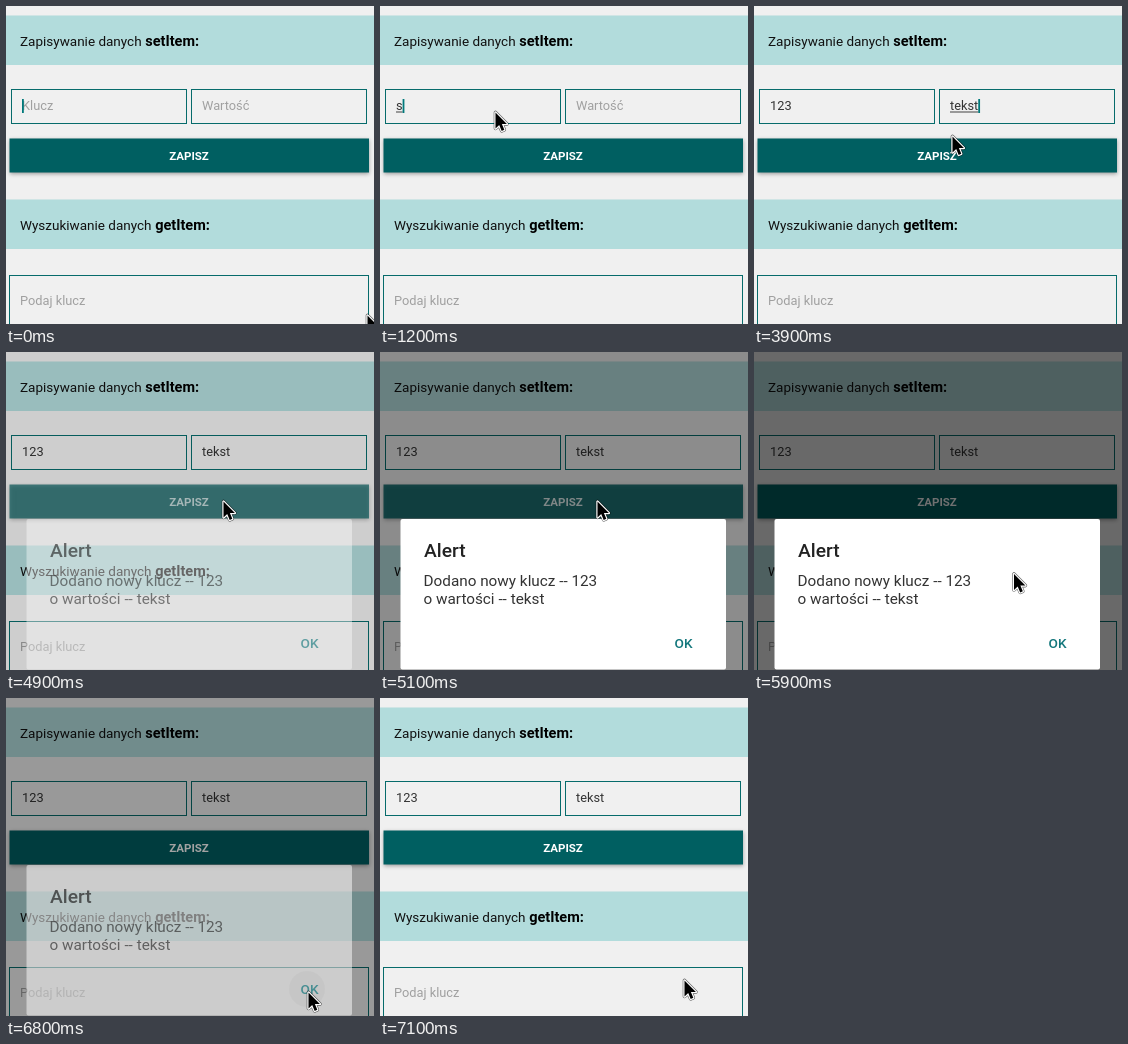
An HTML page with a canvas for the animation above (7.2 s loop, 368x318 px).

```html
<!DOCTYPE html>
<html lang="pl">
<head>
<meta charset="utf-8">
<title>setItem / getItem</title>
<style>
html, body { margin: 0; width: 100%; height: 100%; overflow: hidden; background: #f0f0f0; }
canvas { display: block; width: 368px; height: 318px; }
</style>
</head>
<body>
<canvas id="stage"></canvas>
<script>
const W = 368, H = 318, LOOP = 7200, STEP = 100;
const TEAL = '#005f61', BAND = '#b2dcdc', PAPER = '#f0f0f0', EDGE = '#066b6b';
const HINT = '#a0a0a0', INK = '#333';
const FAMILY = 'Roboto, "Noto Sans", sans-serif';

const canvas = document.getElementById('stage');
const ctx = canvas.getContext('2d');
const ratio = window.devicePixelRatio || 1;
canvas.width = W * ratio;
canvas.height = H * ratio;

const ramp = (t, from, to) => Math.min(1, Math.max(0, (t - from) / (to - from)));
const smooth = p => p * p * (3 - 2 * p);

// Each move glides the pointer to a resting place.
const origin = { x: 361, y: 309 };
const moves = [
  { from: 0, to: 900, x: 115, y: 106 },
  { from: 1900, to: 2500, x: 324, y: 97 },
  { from: 3600, to: 3900, x: 198, y: 130 },
  { from: 3900, to: 4400, x: 217, y: 149 },
  { from: 5500, to: 6300, x: 302, y: 294 },
  { from: 6800, to: 7100, x: 304, y: 282 }
];

function pointerAt(t) {
  return moves.reduce((p, m) => {
    const k = smooth(ramp(t, m.from, m.to));
    return { x: p.x + (m.x - p.x) * k, y: p.y + (m.y - p.y) * k };
  }, origin);
}

function text(str, x, y, size, color, weight = 400) {
  ctx.font = `${weight} ${size}px ${FAMILY}`;
  ctx.fillStyle = color;
  ctx.fillText(str, x, y);
  return ctx.measureText(str).width;
}

function rect(x, y, w, h, color) {
  ctx.fillStyle = color;
  ctx.fillRect(x, y, w, h);
}

function heading(y, label, method) {
  rect(0, y, W, 49.5, BAND);
  const width = text(label + ' ', 14, y + 30.5, 13.5, '#111');
  text(method, 14.3 + width, y + 30.5, 14.5, '#000', 700);
}

function field(x, y, w, h, hint, value, focused) {
  ctx.strokeStyle = EDGE;
  ctx.lineWidth = 1;
  ctx.strokeRect(x + 0.5, y + 0.5, w - 1, h - 1);
  const left = x + 11, base = y + 21;
  const width = value ? text(value, left, base, 12.8, INK) : 0;
  if (!value) text(hint, left, base, 12.8, HINT);
  if (!focused) return;
  if (/[a-z]/.test(value)) rect(left, base + 1.5, width, 1, '#444');
  rect(left + width, base - 11, 1.8, 14, '#00797b');
}

function button(alpha) {
  ctx.save();
  ctx.globalAlpha = alpha;
  ctx.shadowColor = 'rgba(0,0,0,.35)';
  ctx.shadowBlur = 4 * ratio;
  ctx.shadowOffsetY = 1.5 * ratio;
  rect(3.5, 132.5, 359.5, 34, TEAL);
  ctx.shadowColor = 'transparent';
  ctx.textAlign = 'center';
  text('ZAPISZ', 183, 154, 11.5, '#fff', 700);
  ctx.restore();
}

function dialog(alpha, pressed) {
  if (alpha <= 0) return;
  ctx.save();
  ctx.globalAlpha = alpha;
  ctx.fillStyle = '#fff';
  ctx.beginPath();
  ctx.roundRect(20.5, 167, 325.5, 150.5, 2);
  ctx.fill();
  if (pressed) {
    ctx.fillStyle = 'rgba(0,0,0,.05)';
    ctx.beginPath();
    ctx.arc(301, 291, 18, 0, 2 * Math.PI);
    ctx.fill();
  }
  // The lettering stays readable longer than the panel.
  ctx.globalAlpha = Math.sqrt(alpha);
  text('Alert', 44, 205, 19.2, '#222', 500);
  text('Dodano nowy klucz -- 123', 43.5, 234, 15.3, INK);
  text('o wartości -- tekst', 43.5, 252, 15.3, INK);
  text('OK', 294.5, 296, 13.6, '#13777c', 500);
  ctx.restore();
}

const arrowShape = new Path2D('M0 0V16L3.7 12.6L6.2 18.4L8.8 17.3L6.4 11.6H11.4Z');

function arrow({ x, y }) {
  ctx.save();
  ctx.translate(x + 0.5, y + 0.5);
  ctx.lineJoin = 'round';
  ctx.lineWidth = 3.6;
  ctx.strokeStyle = 'rgba(0,0,0,.6)';
  ctx.stroke(arrowShape);
  ctx.lineWidth = 2.4;
  ctx.strokeStyle = '#fff';
  ctx.stroke(arrowShape);
  ctx.fillStyle = '#000';
  ctx.fill(arrowShape);
  ctx.restore();
}

const typed = (word, t, start, gap) =>
  word.slice(0, Math.max(0, Math.floor((t - start) / gap) + 1));

function keyText(t) {
  if (t < 1400) return typed('s', t, 1100, 100);
  return typed('123', t, 1500, 100);
}

function draw(t) {
  ctx.setTransform(ratio, 0, 0, ratio, 0, 0);
  rect(0, 0, W, H, PAPER);
  heading(9.5, 'Zapisywanie danych', 'setItem:');
  field(5, 83, 176, 35, 'Klucz', keyText(t), t < 2300);
  field(185, 83, 176, 35, 'Wartość', typed('tekst', t, 2900, 150), t >= 2700 && t < 4900);
  button(t < 4900 ? 1 : 0.6 + 0.4 * ramp(t, 4800, 5300));
  heading(193.5, 'Wyszukiwanie danych', 'getItem:');
  field(3, 269, 360, 60, '', '', false);
  text('Podaj klucz', 14, 299, 12.8, HINT);

  const dim = 0.56 * (ramp(t, 4800, 5200) - ramp(t, 6660, 7060));
  rect(0, 0, W, H, `rgba(0,0,0,${dim.toFixed(3)})`);
  dialog(ramp(t, 4800, 5050) - ramp(t, 6600, 7000), t >= 6500);
  arrow(pointerAt(t));
}

const begin = performance.now();
function tick() {
  const t = (performance.now() - begin) % LOOP;
  draw(Math.floor(t / STEP) * STEP);
  requestAnimationFrame(tick);
}
tick();
</script>
</body>
</html>
```
